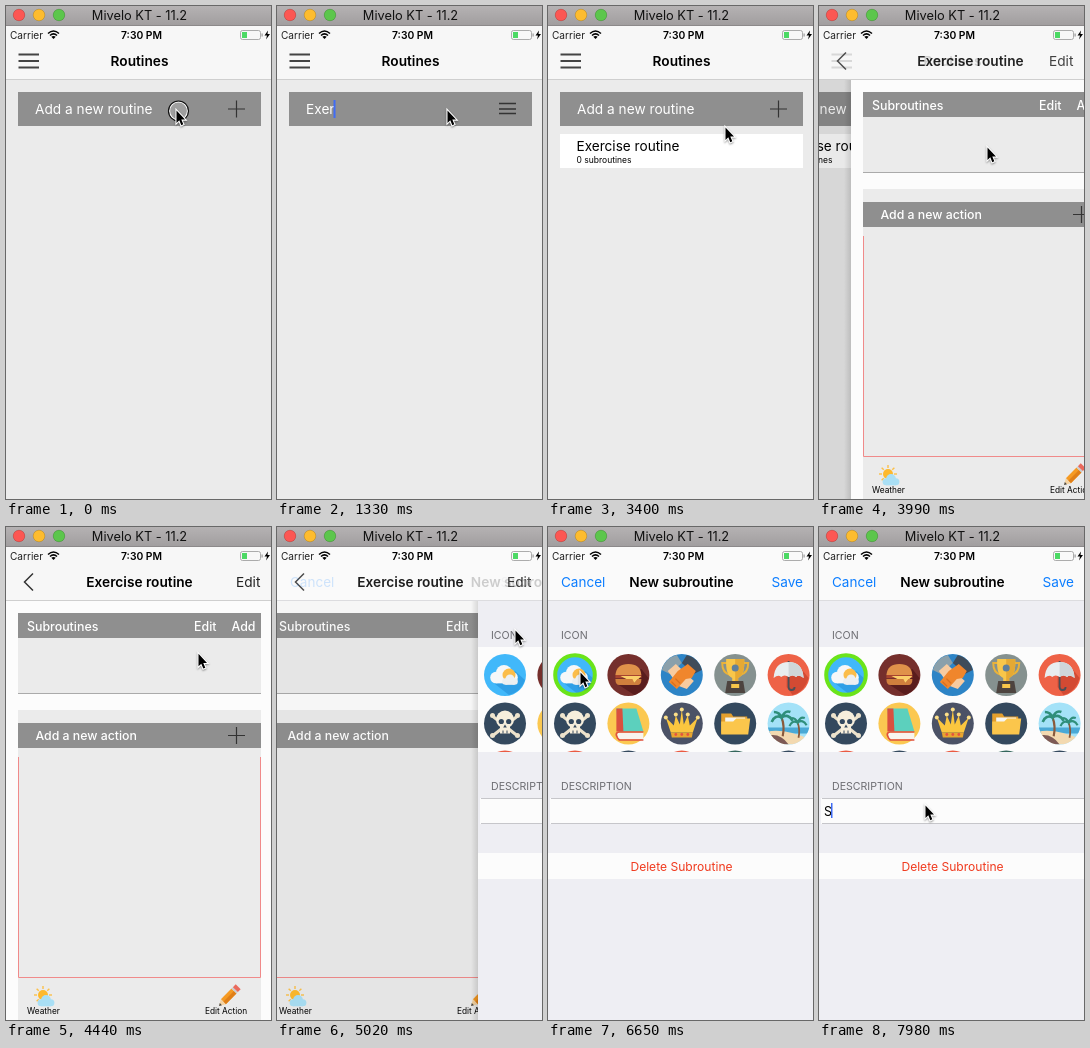
Recreate the animation shown at these times as an HTML page with a canvas. Size 265x493 px, loop 8000 ms.

```html
<!DOCTYPE html>
<html lang="en">
<head>
<meta charset="utf-8">
<title>Routines</title>
<style>
  html, body { margin: 0; width: 100%; height: 100%; overflow: hidden; background: #ebebeb; }
  canvas { display: block; }
</style>
</head>
<body>
<canvas id="stage" width="265" height="493"></canvas>
<script>
const W = 265, H = 493, LOOP = 8000, STEP = 147.8;
const ctx = document.getElementById('stage').getContext('2d');
const BAR = '#8f8f8f', GREY = '#ebebeb', BLUE = '#0b7dff', DARK = '#333';

// ---------- drawing helpers ----------
function rect(x, y, w, h, color) {
  ctx.fillStyle = color;
  ctx.fillRect(x, y, w, h);
}
function disc(x, y, r, color) {
  ctx.fillStyle = color;
  ctx.beginPath();
  ctx.arc(x, y, r, 0, 7);
  ctx.fill();
}
function ring(x, y, r, width, color) {
  ctx.strokeStyle = color;
  ctx.lineWidth = width;
  ctx.beginPath();
  ctx.arc(x, y, r, 0, 7);
  ctx.stroke();
}
function shape(path, color) {
  ctx.fillStyle = color;
  ctx.fill(new Path2D(path));
}
function line(path, color, width = 1, cap = 'butt') {
  ctx.strokeStyle = color;
  ctx.lineWidth = width;
  ctx.lineCap = cap;
  ctx.stroke(new Path2D(path));
}
function text(str, x, y, size, color, weight = 400, align = 'left') {
  ctx.font = `${weight} ${size}px Inter, sans-serif`;
  ctx.fillStyle = color;
  ctx.textAlign = align;
  ctx.fillText(str, x, y);
  return ctx.measureText(str).width;
}
function at(x, y, draw, scale = 1) {
  ctx.save();
  ctx.translate(x, y);
  ctx.scale(scale, scale);
  draw();
  ctx.restore();
}
const plus = (x, y) => line(`M${x - 8.5} ${y}h17M${x} ${y - 8.5}v17`, DARK, 1.2);

// ---------- icons, centred on 0,0 ----------
function cloud(color) {
  disc(-7, 4, 5, color);
  disc(0, 0, 7, color);
  disc(7, 4, 5, color);
  rect(-7, 3, 14, 6, color);
}
function palm() {
  line('M0 0Q3 8 1 17', '#8a5a3c', 2);
  line('M-9 4Q-6 -3 0 0Q6 -4 10 3M-7 -5Q-2 -5 0 0Q3 -7 8 -5', '#2f8f7b', 2.4);
}
const icons = [
  ['#41b8fa', () => {
    shape('M10 -4L20 5Q16 17 4 20L-10 9Z', '#2f9fe6');
    at(-1, -2, () => cloud('#f6f7f8'), 1.15);
    disc(4, 0, 6.5, '#fbbd4a');
    at(5, 4, () => cloud('#eceff1'), .65);
  }],
  ['#752f2c', () => {
    shape('M13 -6L20 3Q17 16 6 20L-11 9Z', '#5a1d1d');
    shape('M-13 0Q-12 -11 0 -11T13 0Z', '#e0924a');
    rect(-13, 0, 26, 3, '#a8452f');
    shape('M-8 1H13L6 8Z', '#fbcf6a');
    shape('M-13 4H4L6 8L9 4H13Q13 10 9 10H-9Q-13 10 -13 4Z', '#d07f3d');
  }],
  ['#2d84c6', () => {
    shape('M-20 -5Q-17 -17 -5 -20L0 -12L-12 -1Z', '#8aa0ab');
    shape('M20 -5Q17 -17 5 -20L0 -12L12 -1Z', '#3f4c5a');
    shape('M-14 -4L-6 -11L12 6L5 14L-3 11Z', '#f7cba0');
    shape('M14 -4L6 -11L-4 -4L-13 7L-5 14L4 4L10 3Z', '#f0862c');
    line('M-10 7L-6 11M-6 4L-2 8', '#d96f1e', 1.2, 'round');
  }],
  ['#85918f', () => {
    line('M-8 -12H-13Q-13 -2 -5 0M8 -12H13Q13 -2 5 0', '#e9b23a', 2);
    shape('M-9 -16H9Q10 0 3 3V8H-3V3Q-10 0 -9 -16Z', '#f8c64a');
    shape('M0 -16H9Q10 0 3 3V8H0Z', '#e5a934');
    disc(0, -7, 3.5, '#5f7f9c');
    shape('M-8 6H8L10 18H-10Z', '#4d443f');
    rect(-4, 9, 8, 4, '#f8c64a');
  }],
  ['#ee6247', () => {
    shape('M12 -7L20 3Q16 17 4 20L-2 12V0Z', '#d34a33');
    line('M0 -14V12Q0 15 3 15T6 12', '#4a4f57', 1.8);
    shape('M-15 3Q-14 -13 0 -13T15 3Q10 -1 7.500 2Q4 -1 0 2Q-4 -1 -7.500 2Q-10 -1 -15 3Z', '#e8edef');
    shape('M0 -13Q14 -13 15 3Q10 -1 7.500 2Q4 -1 0 2Z', '#cfd6d9');
  }],
  ['#34495e', () => {
    line('M-12 -7L12 12M12 -7L-12 12', '#ede3cc', 3, 'round');
    for (const sx of [-1, 1]) for (const y of [-8, 12]) disc(sx * 12.5, y, 2.5, '#ede3cc');
    disc(0, -4, 9, '#f7efdc');
    rect(-5, 2, 10, 8, '#f7efdc');
    disc(-3.7, -2, 2.6, '#34495e');
    disc(3.7, -2, 2.6, '#34495e');
    shape('M0 1L1.800 4H-1.800Z', '#34495e');
    line('M-2 7V10M2 7V10', '#34495e', 1);
  }],
  ['#fbc851', () => {
    shape('M-12 -15H8L15 8H-10Z', '#5cd0bd');
    shape('M-12 -15H-6L-5 8H-12Z', '#d9503f');
    rect(-11, 9, 26, 7, '#f8f5ee');
    line('M15 8.500H-9Q-13 9 -12 12T-9 16.500H15', '#e0503f', 1.6);
  }],
  ['#4b5266', () => {
    shape('M-16 -6L-8 2L-6 -8L-2 1L0 -14L2 1L6 -8L8 2L16 -6L11 9H-11Z', '#fbc63f');
    shape('M-11 9H11L10 14H-10Z', '#e8a52f');
    for (const [x, y] of [[-16, -6], [-6, -9], [0, -14], [6, -9], [16, -6]]) disc(x, y, 2, '#fbdf8a');
    for (const x of [-6, 0, 6]) disc(x, 11, 1.4, '#e5533f');
  }],
  ['#34495e', () => {
    shape('M-14 -10H-4L-2 -7H12V10H-14Z', '#e39f2d');
    rect(-10, -6, 20, 6, '#f5f5f0');
    shape('M-14 -2H-2L1 -5H15L13 11H-14Z', '#fbc64c');
  }],
  ['#a4e2f8', () => {
    ctx.beginPath();
    ctx.arc(0, 0, 21, 0, 7);
    ctx.clip();
    rect(-21, 4, 42, 6, '#4aa9d6');
    shape('M-21 8Q-2 5 21 16V21H-21Z', '#f3d9b0');
    shape('M-21 12Q-8 9 0 21H-21Z', '#7d5a55');
    at(-7, -6, palm, 1.1);
    at(9, -1, palm, .9);
  }],
];
const nextRow = ['#ea5a42', '#34495e', '#ea5a42', '#33665c', '#34495e'];
const iconX = i => 27 + 53.4 * (i % 5);

// ---------- pages: body and navigation bar ----------
function header(title, shift) {
  text(title, W / 2 + 1 + shift, 60, 13.7, '#000', 600, 'center');
}

const listPage = {
  body(n) {
    rect(0, 73, W, H, GREY);
    rect(12, 86, 243, 34, BAR);
    const editing = n >= 1 && n < 19;
    if (editing) {
      line('M222 97.500h17M222 103h17M222 107.500h17', DARK, 1.7);
      const count = n < 4 ? 0 : n < 7 ? 1 : n < 9 ? 2 : n < 11 ? 4 : Math.min(16, 4 + 2 * (n - 10));
      const typed = 'Exercise routine'.slice(0, count);
      const width = text(typed || 'Add a new routine', 29, 108, 13.7, '#fff');
      if (n >= 2 && n !== 4) rect(count ? 28 + width : 28, 94, 2, 18, '#3f6cf5');
    } else {
      text('Add a new routine', 29, 108, 13.7, '#fff');
      plus(230.5, 103);
    }
    if (n >= 19) {
      rect(12, 128, 243, 34, '#fff');
      text('Exercise routine', 28.5, 145, 13.6, '#000');
      text('0 subroutines', 28.5, 157, 8.5, '#000');
    }
  },
  nav(n, shift) {
    line('M12.500 48.500H33M12.500 55H33M12.500 61.500H33', '#444', 1.8);
    header('Routines', shift);
  },
};

const routinePage = {
  body() {
    rect(0, 73, W, H, '#fcfcfc');
    rect(12, 86, 243, 81, GREY);
    rect(12, 86, 243, 25, BAR);
    text('Subroutines', 21, 103.5, 12.4, '#fff', 500);
    text('Edit', 188, 103.5, 12.4, '#fff', 500);
    text('Add', 225.5, 103.5, 12.4, '#fff', 500);
    rect(12, 166, 243, 1, '#aaa');
    rect(12, 183, 243, H, GREY);
    rect(12, 196, 243, 25, BAR);
    text('Add a new action', 29.5, 213, 12.3, '#fff', 500);
    plus(230.5, 208.5);
    line('M12.500 230V450.500H254.500V230', '#f08a8a');
    at(37, 468, () => {
      for (let i = 0; i < 8; i++) {
        ctx.rotate(Math.PI / 4);
        line('M6 0H9', '#fbc04a', 1.4);
      }
      disc(0, 0, 5, '#fdb92d');
      at(3, 5, () => cloud('#a9dff5'), .7);
    });
    text('Weather', 37.5, 487, 8.3, '#000', 400, 'center');
    at(223, 469, () => {
      ctx.rotate(-Math.PI / 4);
      rect(-8, -3.5, 15, 7, '#f59a23');
      rect(-8, 0, 15, 3.5, '#e07f18');
      rect(7, -3.5, 2, 7, '#c9ced1');
      rect(9, -3.5, 4, 7, '#ea6a5c');
      shape('M-8 -3.500L-14 0L-8 3.500Z', '#f5d3a2');
      shape('M-11.500 -1.500L-14 0L-11.500 1.500Z', '#444');
    });
    text('Edit Action', 220, 487, 8.3, '#000', 400, 'center');
  },
  nav(n, shift) {
    line('M27 46.500L18.500 55L27 63.500', '#333', 1.5);
    header('Exercise routine', shift);
    text('Edit', 230, 60, 13.7, '#222');
  },
};

const subroutinePage = {
  body(n) {
    rect(0, 73, W, H, '#eeeef3');
    text('ICON', 13, 111.5, 10.6, '#6d6d72');
    rect(0, 120, W, 105, '#fcfcfc');
    ctx.save();
    ctx.beginPath();
    ctx.rect(0, 120, W, 105);
    ctx.clip();
    icons.forEach(([color, draw], i) => at(iconX(i), i < 5 ? 148 : 196.5, () => {
      disc(0, 0, 21, color);
      draw();
    }));
    nextRow.forEach((color, i) => disc(iconX(i), 244.5, 21, color));
    if (n >= 43) ring(27, 148, 19.8, 4, '#6be41a');
    ctx.restore();
    text('DESCRIPTION', 13, 263, 10.6, '#6d6d72');
    rect(2, 271, W, 26, '#fcfcfc');
    rect(3, 271, W, 1, '#c6c6ca');
    rect(3, 296, W, 1, '#c6c6ca');
    const width = n >= 54 ? text('S', 5, 288.5, 12.4, '#000') : 0;
    if (n >= 52) rect(5 + Math.floor(width), 276, 1.5, 15, '#3f6cf5');
    rect(0, 326, W, 26, '#fcfcfc');
    text('Delete Subroutine', 133.5, 343.5, 12.1, '#f03a1e', 400, 'center');
  },
  nav(n, shift) {
    text('Cancel', 13, 60, 13.5, BLUE);
    header('New subroutine', shift);
    text('Save', 255, 60, 13.6, n >= 43 ? BLUE : '#cbcbcf', 400, 'right');
  },
};

// ---------- window frame and pointer ----------
function chrome() {
  const fill = ctx.createLinearGradient(0, 0, 0, 20);
  fill.addColorStop(0, '#b5b2b3');
  fill.addColorStop(1, '#a09d9e');
  rect(0, 0, W, 20, fill);
  rect(0, 19, W, 1, '#8c898a');
  ['#fc5753', '#fdbc2f', '#5cc64c'].forEach((color, i) => {
    disc(13 + 20 * i, 9, 6, color);
    ring(13 + 20 * i, 9, 5.8, .6, 'rgba(0,0,0,.25)');
  });
  text('Mivelo KT - 11.2', 133.5, 14, 12.8, '#111', 400, 'center');

  text('Carrier', 4, 32.5, 10.1, '#222');
  line('M42 27.500Q47.500 22.500 53 27.500M44 29.500Q47.500 26.200 51 29.500', '#000', 1.5);
  shape('M45.300 30.800Q47.500 29 49.700 30.800L47.500 33Z', '#000');
  text('7:30 PM', 135.5, 32.5, 10.3, '#000', 600, 'center');
  ctx.strokeStyle = '#999';
  ctx.lineWidth = .8;
  ctx.beginPath();
  ctx.roundRect(234.5, 24.5, 20, 9, 2);
  ctx.stroke();
  rect(236, 26, 5, 6, '#4cd964');
  rect(255.5, 27.5, 1.2, 3, '#999');
  shape('M262 24.500L258.500 29.500H261L260 33.500L264 28H261.500Z', '#000');
}

// [step, x, y] of the arrow tip
const pointerPath = [
  [0, 170, 104], [22, 170, 104], [23, 177, 121], [25, 169, 141], [27, 168, 141], [29, 170, 138],
  [32, 236, 103], [34, 238, 103], [37, 109, 154], [39, 95, 156], [42, 32, 145], [46, 32, 145],
  [49, 118, 266], [50, 106, 278], [99, 106, 278],
];
const clicks = [0, 25, 33, 43];

function pointer(n) {
  const i = pointerPath.findIndex(key => key[0] > n);
  const [n0, x0, y0] = pointerPath[i - 1], [n1, x1, y1] = pointerPath[i];
  const k = (n - n0) / (n1 - n0);
  at(x0 + (x1 - x0) * k, y0 + (y1 - y0) * k, () => {
    if (clicks.includes(n)) {
      disc(2.5, 1, 10, 'rgba(255,255,255,.15)');
      ring(2.5, 1, 9, 1.2, '#fff');
      ring(2.5, 1, 10, 1.2, '#111');
    }
    const arrow = 'M.500 .500V13L3.300 10.300L5.300 15.200L7.300 14.300L5.300 9.600H9Z';
    ctx.shadowColor = 'rgba(0,0,0,.4)';
    ctx.shadowBlur = 2;
    ctx.shadowOffsetY = 1;
    line(arrow, '#fff', 2.2);
    ctx.shadowColor = 'transparent';
    shape(arrow, '#000');
  });
}

// ---------- timeline ----------
function pushProgress(time, start) {
  const u = Math.min(1, Math.max(0, (time - start) / 500));
  return 1 - (1 - u) ** 3;
}

function edgeShadow(x) {
  const fade = ctx.createLinearGradient(x - 7, 0, x, 0);
  fade.addColorStop(0, 'rgba(0,0,0,0)');
  fade.addColorStop(1, 'rgba(0,0,0,.12)');
  rect(x - 7, 73, 7, H, fade);
}

function render(time) {
  const n = Math.floor((time + 10) / STEP);
  const first = pushProgress(n * STEP, 3737), second = pushProgress(n * STEP, 4981);
  const [from, to, p] = second > 0 ? [routinePage, subroutinePage, second] : [listPage, routinePage, first];
  const x = Math.round(W * (1 - p));

  at(-Math.round(.3 * W * p), 0, () => from.body(n));
  if (p > 0) {
    rect(0, 73, x, H, `rgba(0,0,0,${.1 * p})`);
    if (p < 1) edgeShadow(x);
    at(x, 0, () => to.body(n));
  }

  rect(0, 20, W, 53, to === subroutinePage ? '#fafafa' : '#f7f7f7');
  rect(0, 73, W, 1, to === subroutinePage ? '#dcdcdf' : '#cfcfcf');
  ctx.globalAlpha = 1 - p ** 1.5;
  from.nav(n, 0);
  ctx.globalAlpha = p ** 1.2;
  if (p > 0) to.nav(n, x * .56);
  ctx.globalAlpha = 1;

  chrome();
  pointer(n);
}

const begin = performance.now();
function frame() {
  render((performance.now() - begin) % LOOP);
  requestAnimationFrame(frame);
}
frame();
</script>
</body>
</html>
```
